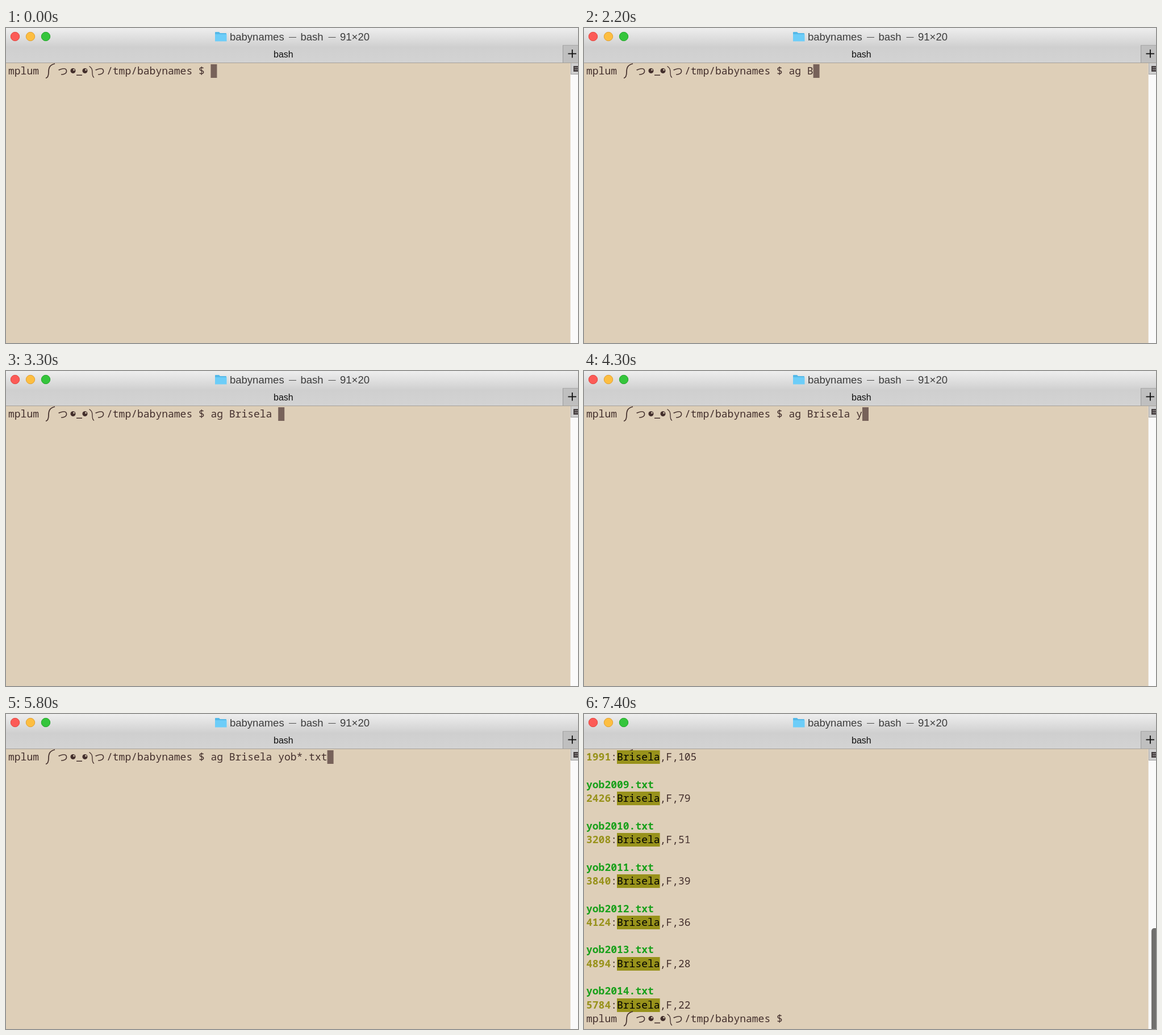
Write an HTML page with a canvas that moves like this. It is 1007 by 556 pixels and loops after 7.5 s.

```html
<!DOCTYPE html>
<html lang="en">
<head>
<meta charset="utf-8">
<title>Terminal search</title>
<style>
html, body { margin: 0; width: 100%; height: 100%; overflow: hidden; background: #decfb8; }
canvas { display: block; width: 1007px; height: 556px; }
</style>
</head>
<body>
<canvas id="stage" width="1007" height="556"></canvas>
<script>
const ctx = document.getElementById('stage').getContext('2d');
const W = 1007, H = 556, LOOP = 7500;
const LEFT = 4, TOP = 64, COL = 10.8, ROW = 24.32, INPUT_X = 360.4;
const MONO = '"Noto Sans Mono", "DejaVu Sans Mono", monospace';
const SANS = '"Liberation Sans", Arial, sans-serif';
const CJK = '"Noto Sans CJK JP", "Noto Sans CJK", sans-serif';
const INK = '#432f2c', PAPER = '#decfb8', OLIVE = '#98921b', GREEN = '#18a01a', CURSOR = '#77625a';

const USER = 'mplum', NAME = 'Brisela';
const COMMAND = `ag ${NAME} yob*.txt`;
// Moment at which each character of the command appears
const KEYS = [1800, 1900, 2000, 2200, 2400, 2500, 2700, 2800, 2900, 3000, 3200,
              4300, 4500, 4700, 5000, 5200, 5400, 5500, 5700];
const ENTER = 6300, OUTPUT = 6500;
const BLINKS = [[600, 1200], [3800, 4300], [7100, LOOP]];
const HITS = [[1991, 105], [2426, 79], [3208, 51], [3840, 39], [4124, 36], [4894, 28], [5784, 22]];

const rowY = row => TOP + row * ROW;

function rect(x, y, w, h, color) {
  ctx.fillStyle = color;
  ctx.fillRect(x, y, w, h);
}

function text(str, x, y, color, font) {
  ctx.font = font;
  ctx.fillStyle = color;
  ctx.fillText(str, x, y);
}

function mono(str, x, row, color = INK, weight = 400) {
  text(str, x, rowY(row) + 18, color, `${weight} 18px ${MONO}`);
}

function disc(x, y, r, color, edge) {
  ctx.beginPath();
  ctx.arc(x, y, r, 0, Math.PI * 2);
  ctx.fillStyle = color;
  ctx.fill();
  if (edge) {
    ctx.strokeStyle = edge;
    ctx.lineWidth = 1;
    ctx.stroke();
  }
}

function stroke(path, width, color = INK) {
  ctx.strokeStyle = color;
  ctx.lineWidth = width;
  ctx.stroke(new Path2D(path));
}

function leftBrace(row) {
  ctx.save();
  ctx.translate(0, rowY(row));
  stroke('M70 24.5 C74 23.5 75 20 75 14 C75 6 77 1 86 -1', 1.7);
  ctx.restore();
}

function eye(x, y) {
  disc(x, y, 4.5, INK);
  disc(x + 1.5, y - 1.5, 1.4, PAPER);
}

function prompt(row) {
  const y = rowY(row);
  mono(USER, LEFT, row);
  leftBrace(row);
  text('つ', 91, y + 18.5, INK, `400 18px ${CJK}`);
  eye(118, y + 11.5);
  rect(124, y + 18.5, 10, 1.5, INK);
  eye(139, y + 11.5);
  ctx.save();
  ctx.translate(0, y);
  stroke('M146.5 3.5 C151 6 152 9 152 15 C152 19 152.5 22 155 23.5', 1.3);
  ctx.restore();
  text('つ', 156, y + 18.5, INK, `500 18px ${CJK}`);
  mono('/tmp/babynames $', 177, row);
}

function cursor(x, row) {
  rect(x, Math.round(rowY(row)), 11, 24, CURSOR);
}

function results() {
  HITS.forEach(([line, count], i) => {
    const row = i * 3;
    if (i) mono(`yob${2008 + i}.txt`, LEFT, row - 1, GREEN, 700);
    mono(String(line), LEFT, row, OLIVE, 700);
    mono(':', LEFT + 4 * COL, row);
    rect(58, Math.round(rowY(row)), NAME.length * COL, 24, OLIVE);
    mono(NAME, 58, row, '#000');
    mono(`,F,${count}`, 58 + NAME.length * COL, row);
  });
  // Sliver of the scrolled-off prompt
  ctx.save();
  ctx.beginPath();
  ctx.rect(0, 62, 100, 2.5);
  ctx.clip();
  leftBrace(0);
  ctx.restore();
}

function titleBar() {
  const g = ctx.createLinearGradient(0, 0, 0, 61);
  g.addColorStop(0, '#eeeeee');
  g.addColorStop(0.47, '#d4d4d4');
  g.addColorStop(0.55, '#cfcfcf');
  g.addColorStop(1, '#d3d3d3');
  rect(0, 0, W, 61, g);
  rect(0, 61, W, 1, '#a6a19a');

  disc(16, 15, 7.7, '#fc5b57', '#e2463f');
  disc(43, 15, 7.7, '#fdbe41', '#e0a033');
  disc(70, 15, 7.7, '#35c53c', '#22a62a');

  ctx.fillStyle = '#55b9e8';
  ctx.fill(new Path2D('M368 8 Q368 7 369 7 H375 L377 9 H387 Q388 9 388 10 V23 H368 Z'));
  rect(368, 11, 20.5, 12.5, '#6dcdf8');

  const title = `18.5px ${SANS}`, dash = `13px ${SANS}`, gray = '#3c3c3c';
  text('babynames', 394, 22, gray, title);
  text('—', 498, 20, gray, dash);
  text('bash', 518.5, 22, gray, title);
  text('—', 567.5, 20, gray, dash);
  text('91×20', 588, 22, gray, title);
  text('bash', 471, 51.5, '#111', `16px ${SANS}`);

  rect(980, 30, 27, 31, '#bfbfbf');
  rect(980, 30, 1, 31, '#9d9d9d');
  rect(980, 30, 27, 1, '#a9a9a9');
  rect(989.5, 44.5, 14.5, 1.8, '#111');
  rect(996, 38, 1.8, 14.5, '#111');
}

function scrollTrack(scrolled) {
  rect(993, 62, 1, H - 62, '#e6ddd0');
  rect(994, 62, 13, H - 62, '#fafafa');
  rect(994, 62, 13, 20, '#cfcfcf');
  rect(994, 62, 1, 20, '#aaa');
  rect(994, 81, 13, 1, '#999');
  rect(999, 67, 8, 10, '#453f40');
  rect(1001, 69.5, 6, 1.2, '#9a9696');
  rect(1001, 73, 6, 1.2, '#9a9696');
  if (scrolled) {
    ctx.fillStyle = '#706f6d';
    ctx.beginPath();
    ctx.roundRect(999, 378, 14, 190, 5);
    ctx.fill();
  }
}

function draw(t) {
  const lit = !BLINKS.some(([off, on]) => t >= off && t < on);
  const done = t >= OUTPUT;
  rect(0, 0, W, H, PAPER);
  if (done) {
    results();
    prompt(19);
    if (lit) cursor(INPUT_X, 19);
  } else {
    const typed = KEYS.filter(k => k <= t).length;
    prompt(0);
    mono(COMMAND.slice(0, typed), INPUT_X, 0);
    if (t >= ENTER) cursor(LEFT, 1);
    else if (lit) cursor(INPUT_X + typed * COL, 0);
  }
  scrollTrack(done);
  titleBar();
}

function tick() {
  draw(performance.now() % LOOP);
  requestAnimationFrame(tick);
}
tick();
</script>
</body>
</html>
```
